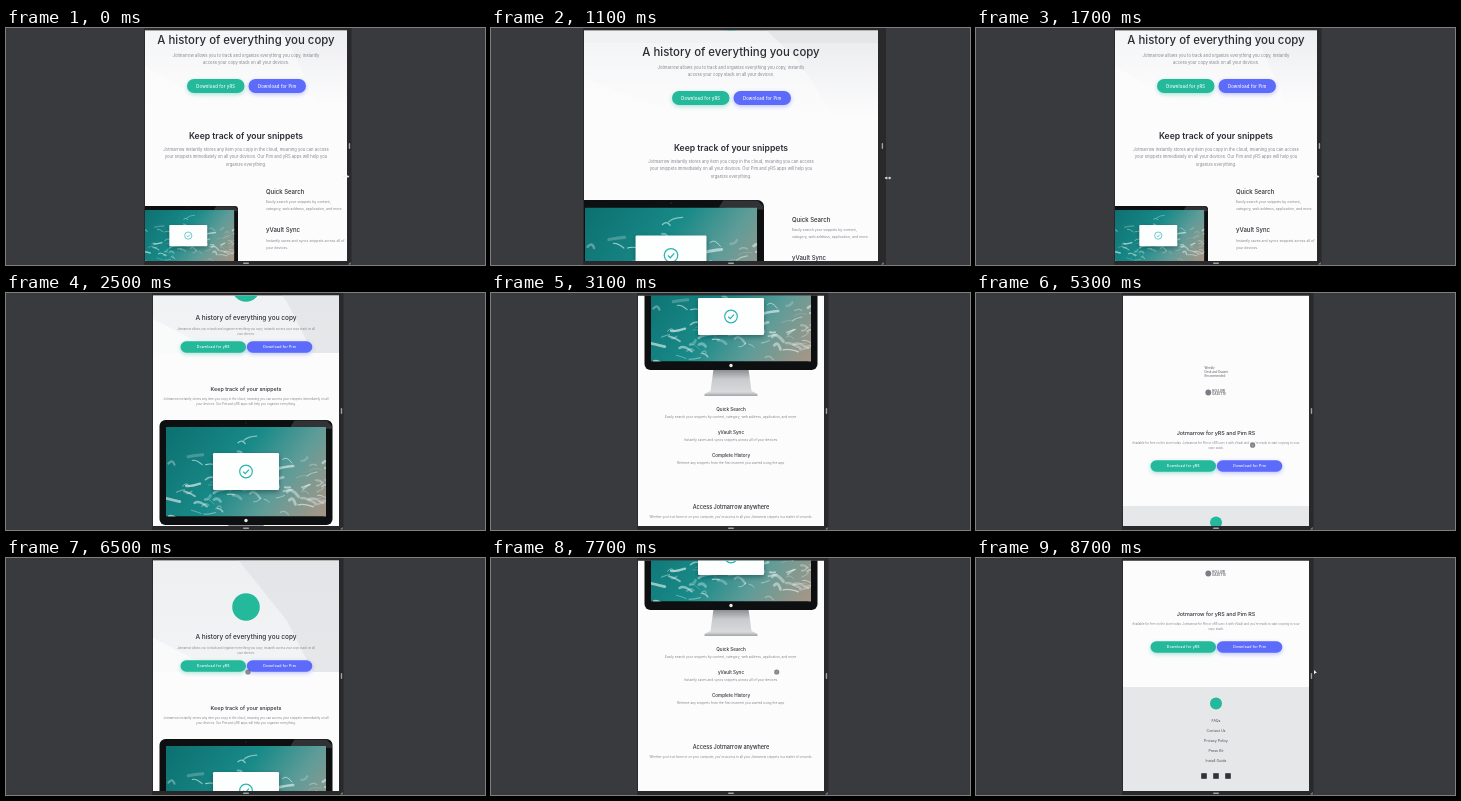
Animation, 479 px wide and 237 px high, one loop 8800 ms. Source, as an HTML page with a canvas:

```html
<!DOCTYPE html>
<html lang="en">
<head>
<meta charset="utf-8">
<title>Responsive landing page</title>
<style>
html, body { margin: 0; width: 100%; height: 100%; overflow: hidden; background: #393a3e; }
canvas { display: block; width: 479px; height: 237px; }
</style>
</head>
<body>
<canvas id="stage"></canvas>
<script>
const W = 479, H = 237, LOOP = 8800, STEP = 100;
const MID = 240, TOP = 2.5, BOTTOM = 233;
const TEAL = '#25b99c', BLUE = '#5c6bfa', INK = '#2b2d33', SOFT = '#85878d';
const canvas = document.getElementById('stage');
const ctx = canvas.getContext('2d');
const dpr = window.devicePixelRatio || 1;
canvas.width = W * dpr;
canvas.height = H * dpr;

// Key times in ms, each followed by its values
const halfWidth = [[0, 101], [100, 100.5], [300, 99], [800, 99], [900, 112], [1000, 130], [1100, 147],
  [1200, 155], [1300, 158], [1400, 151], [1500, 135], [1600, 117], [1700, 101], [1800, 98], [1900, 94], [2000, 93]];
const scrollPos = [[1900, 42], [2200, 50], [2500, 54], [2700, 74], [3100, 209], [3500, 315], [4000, 438],
  [4400, 507], [4700, 520], [5000, 514], [5400, 410], [5900, 195], [6300, 24], [6500, 0],
  [6900, 0], [7200, 38], [7600, 190], [8100, 410], [8500, 508], [8700, 520]];
const outPath = [[1800, 342, 149], [2000, 380, 142], [2200, 430, 130], [2400, 471, 118]];
const dotPath = [[3500, 300, 172], [4400, 291, 172], [5400, 275, 150], [6500, 242, 114], [7200, 250, 114], [7900, 300, 114]];
const lastPath = [[8000, 322, 114], [8700, 339, 114]];

function track(keys, t, i = 1) {
  if (t <= keys[0][0]) return keys[0][i];
  for (let k = 1; k < keys.length; k++) {
    const a = keys[k - 1], b = keys[k];
    if (t <= b[0]) return a[i] + (b[i] - a[i]) * (t - a[0]) / (b[0] - a[0]);
  }
  return keys[keys.length - 1][i];
}

function rng(seed) {
  return () => (seed = (seed * 16807) % 2147483647) / 2147483647;
}

function rect(x, y, w, h, color) {
  ctx.fillStyle = color;
  ctx.fillRect(x, y, w, h);
}

function pill(x, y, w, h, r, color) {
  ctx.fillStyle = color;
  ctx.beginPath();
  ctx.roundRect(x, y, w, h, r);
  ctx.fill();
}

function poly(points, color) {
  ctx.fillStyle = color;
  ctx.beginPath();
  points.forEach(([x, y]) => ctx.lineTo(x, y));
  ctx.fill();
}

function disc(x, y, r, color) {
  ctx.fillStyle = color;
  ctx.beginPath();
  ctx.arc(x, y, r, 0, Math.PI * 2);
  ctx.fill();
}

function text(str, x, y, size, color = SOFT, weight = 400, align = 'center', gap = 0) {
  ctx.font = `${weight} ${size}px Inter, Roboto, sans-serif`;
  ctx.letterSpacing = gap + 'px';
  ctx.textAlign = align;
  ctx.textBaseline = 'middle';
  ctx.fillStyle = color;
  ctx.fillText(str, x, y);
}

function lines(rows, x, y, lead, size, align) {
  rows.forEach((row, i) => text(row, x, y + i * lead, size, SOFT, 400, align));
}

function button(label, x, y, w, h, color, size) {
  ctx.save();
  ctx.shadowColor = color + '66';
  ctx.shadowBlur = 4 * dpr;
  ctx.shadowOffsetY = 1.5 * dpr;
  pill(x, y - h / 2, w, h, h / 2, color);
  ctx.restore();
  text(label, x + w / 2, y + 0.3, size, '#fff', 500, 'center', 0.2);
}

function buttons(y, wide) {
  const w = wide ? 57.5 : 65.5, h = wide ? 14 : 11.5, size = wide ? 4.2 : 3.5;
  const x = wide ? 181 : 174.5, gap = wide ? 4 : 0.8;
  button('Download for yRS', x, y, w, h, TEAL, size);
  button('Download for Pim', x + w + gap, y, w, h, BLUE, size);
}

function headerTint(left, right, top, bottom) {
  const g = ctx.createLinearGradient(0, bottom, 0, top);
  g.addColorStop(0, '#f3f4f5');
  g.addColorStop(1, '#eeeff0');
  rect(left, top, right - left, bottom - top, g);
  const w = right - left, h = bottom - top;
  poly([[left + w * 0.45, top], [right, top], [right, bottom], [left + w * 0.86, bottom],
    [left + w * 0.72, top + h * 0.55]], 'rgba(214,216,220,.45)');
  poly([[left, bottom - h * 0.3], [left + w * 0.35, bottom], [left, bottom]], 'rgba(255,255,255,.6)');
}

function sea() {
  const g = ctx.createLinearGradient(6, 7, 150, 110);
  g.addColorStop(0, '#0d6f70');
  g.addColorStop(0.45, '#188a88');
  g.addColorStop(0.72, '#5f9c98');
  g.addColorStop(1, '#a39687');
  rect(6, 7, 161, 89.5, g);
  const rand = rng(41);
  ctx.lineCap = 'round';
  for (let i = 0; i < 85; i++) {
    const u = rand(), v = (rand() + rand()) / 2;
    const x = 6 + u * 160, y = 22 + v * 82 + Math.sin(u * 9) * 7;
    ctx.strokeStyle = `rgba(236,246,245,${0.2 + rand() * 0.5})`;
    ctx.lineWidth = 0.6 + rand() * 2.4;
    ctx.beginPath();
    ctx.moveTo(x, y);
    ctx.quadraticCurveTo(x + 4, y - 5 + rand() * 6, x + 5 + rand() * 10, y - 5 + rand() * 10);
    ctx.stroke();
  }
}

function monitor(x, y, scale) {
  ctx.save();
  ctx.translate(x, y);
  ctx.scale(scale, scale);
  const g = ctx.createLinearGradient(0, 105, 0, 131);
  g.addColorStop(0, '#8d8f93');
  g.addColorStop(0.35, '#c9cacd');
  g.addColorStop(0.85, '#d9dadc');
  g.addColorStop(1, '#a2a4a8');
  poly([[69, 104], [104, 104], [107, 126], [113, 129], [113, 131], [60, 131], [60, 129], [66, 126]], g);
  pill(0, 0, 173, 105, 6, '#0e0f11');
  poly([[135, 0.5], [167, 0.5], [172.5, 6], [172.5, 9], [131, 7]], '#303235');
  ctx.save();
  ctx.beginPath();
  ctx.rect(6.5, 7, 160, 89.5);
  ctx.clip();
  sea();
  ctx.restore();
  disc(86.5, 3, 0.6, '#3b3d42');
  disc(86.5, 100.5, 1.7, '#e6e7e9');
  ctx.save();
  ctx.shadowColor = 'rgba(0,40,45,.45)';
  ctx.shadowBlur = 5 * dpr;
  ctx.shadowOffsetY = 2 * dpr;
  pill(53.5, 33, 66, 37, 1.2, '#fdfefe');
  ctx.restore();
  ctx.strokeStyle = '#2bb5b0';
  ctx.lineWidth = 1.2;
  ctx.beginPath();
  ctx.arc(86.5, 51.5, 6.3, 0, Math.PI * 2);
  ctx.moveTo(83.7, 51.7);
  ctx.lineTo(85.8, 53.7);
  ctx.lineTo(89.5, 49.6);
  ctx.stroke();
  ctx.restore();
}

function widePage(half) {
  const k = (half - 101) / 46;
  const y = 13 + 12 * k;
  headerTint(MID - half, MID + half, y - 70, y + 66);
  const fade = ctx.createLinearGradient(0, y - 10, 0, y + 66);
  fade.addColorStop(0, 'rgba(252,252,253,.35)');
  fade.addColorStop(1, '#fcfcfd');
  rect(MID - half, y - 10, half * 2, 77, fade);
  disc(MID, y - 40, 18, TEAL);
  text('A history of everything you copy', MID, y, 11.4, INK, 500);
  lines(['Jotmarrow allows you to track and organize everything you copy, instantly',
    'access your copy stack on all your devices.'], MID, y + 15, 7.2, 4.2);
  buttons(y + 45, true);
  text('Keep track of your snippets', MID, y + 95, 8.6, INK, 600);
  lines(['Jotmarrow instantly stores any item you copy in the cloud, meaning you can access',
    'your snippets immediately on all your devices. Our Pim and yRS apps will help you',
    'organize everything.'], MID, y + 108.7, 7.4, 4.2);

  const x = MID + 20 + 41 * k;
  const scale = 0.575 + 0.5 * k;
  const top = y + 165 - 18 * k;
  monitor(x - 28 - 173 * scale, top, scale);
  const first = y + 151 + 16 * k;
  [['Quick Search', 'Easily search your snippets by content,', 'category, web address, application, and more.'],
    ['yVault Sync', 'Instantly saves and syncs snippets across all of', 'your devices.']
  ].forEach(([title, ...rows], i) => {
    text(title, x, first + i * 38.7, 6, INK, 500, 'left');
    lines(rows, x, first + i * 38.7 + 9.8, 7.2, 3.5, 'left');
  });
}

function narrowPage(half, scroll) {
  ctx.save();
  ctx.translate(0, -scroll);
  headerTint(MID - half, MID + half, 0, 114);
  disc(MID, 49, 13.8, TEAL);
  text('A history of everything you copy', MID, 79.5, 6.5, INK, 500);
  lines(['Jotmarrow allows you to track and organize everything you copy, instantly access your copy stack on all',
    'your devices.'], MID, 90, 5.2, 2.8);
  buttons(108, false);

  text('Keep track of your snippets', MID, 150, 5.4, INK, 500);
  lines(['Jotmarrow instantly stores any item you copy in the cloud, meaning you can access your snippets immediately on all',
    'your devices. Our Pim and yRS apps will help you organize everything.'], MID, 159.7, 5.5, 3);
  monitor(153.5, 181, 1);

  [['Quick Search', 'Easily search your snippets by content, category, web address, application, and more.'],
    ['yVault Sync', 'Instantly saves and syncs snippets across all of your devices.'],
    ['Complete History', 'Retrieve any snippets from the first moment you started using the app.']
  ].forEach(([title, row], i) => {
    text(title, MID, 326 + i * 23, 4.6, INK, 500);
    text(row, MID, 333.5 + i * 23, 3.25);
  });
  text('Access Jotmarrow anywhere', MID, 423, 5.5, INK, 500);
  text("Whether you're at home or on your computer, you've access to all your Jotmarrow snippets in a matter of seconds.",
    MID, 433.5, 3);

  ['Weekly', 'Desk and Drawer', 'Recommended'].forEach((row, i) =>
    text(row, 228.5, 511.5 + i * 3.6, 2.9, '#6f7177', 500, 'left'));
  disc(232.3, 535.5, 2.9, '#7b7d83');
  text('HOLLOW', 236, 534, 3, '#6f7177', 700, 'left');
  text('GAZETTE', 236, 537.4, 3, '#6f7177', 700, 'left');

  text('Jotmarrow for yRS and Pim RS', MID, 576.3, 5.4, INK, 500);
  lines(["Available for free on the store today. Jotmarrow for Pim or yRS sync it with yVault and you're ready to start copying to your",
    'copy stack.'], MID, 585.7, 5.6, 2.9);
  buttons(609, false);

  rect(MID - half, 649, half * 2, 110, '#e6e7e9');
  disc(MID, 665.5, 6, TEAL);
  ['FAQs', 'Contact Us', 'Privacy Policy', 'Press Kit', 'Install Guide'].forEach((row, i) =>
    text(row, MID, 683 + i * 9.9, 3.6, '#4d4f55'));
  [228, 240, 252].forEach(x => rect(x - 2.8, 735.2, 5.6, 5.6, '#303238'));
  ctx.restore();
}

function arrows(x, y) {
  rect(x - 2, y - 0.4, 4, 0.8, '#f2f2f3');
  poly([[x - 3.3, y], [x - 1.4, y - 1.5], [x - 1.4, y + 1.5]], '#f2f2f3');
  poly([[x + 3.3, y], [x + 1.4, y - 1.5], [x + 1.4, y + 1.5]], '#f2f2f3');
}

function pointer(x, y) {
  poly([[x - 1, y - 2], [x + 2, y + 0.8], [x + 0.4, y + 1], [x - 1, y + 2.3]], '#f2f2f3');
}

function cursor(t, right) {
  if (t < 1800) {
    const moving = t >= 900 && t < 1700;
    arrows(right + (moving ? 10 : -1), moving ? 150 : 148.5);
  } else if (t <= 2400) {
    pointer(track(outPath, t, 1), track(outPath, t, 2));
  } else if (t >= 3500 && t < 8000) {
    const x = track(dotPath, t, 1), y = track(dotPath, t, 2);
    disc(x, y, 2.6, 'rgba(92,94,100,.75)');
    disc(x, y, 1.4, 'rgba(150,152,157,.7)');
  } else if (t >= 8000) {
    pointer(track(lastPath, t, 1), track(lastPath, t, 2));
  }
}

function draw(t) {
  const half = track(halfWidth, t);
  const left = MID - half, right = MID + half;
  const strip = t >= 900 && t < 1700 ? 8 : 4.5;
  ctx.setTransform(dpr, 0, 0, dpr, 0, 0);
  rect(0, 0, W, H, '#393a3e');
  rect(left - 0.8, 0, half * 2 + 0.8 + strip, H, '#29292c');

  ctx.save();
  ctx.beginPath();
  ctx.rect(left, TOP, half * 2, BOTTOM - TOP);
  ctx.clip();
  rect(left, TOP, half * 2, BOTTOM - TOP, '#fcfcfd');
  if (half > 96) widePage(half);
  else narrowPage(half, track(scrollPos, t));
  ctx.restore();

  const grip = right + strip * 0.55;
  pill(grip - 0.7, 115, 1.4, 6, 0.7, '#a0a1a5');
  pill(MID - 3, 234.5, 6, 1.4, 0.7, '#a0a1a5');
  poly([[grip + 1.2, 234], [grip + 1.2, 236.5], [grip - 1.3, 236.5]], '#8c8d91');
  cursor(t, right);
}

function tick(now) {
  draw(Math.floor((now % LOOP) / STEP) * STEP);
  requestAnimationFrame(tick);
}
requestAnimationFrame(tick);
</script>
</body>
</html>
```
